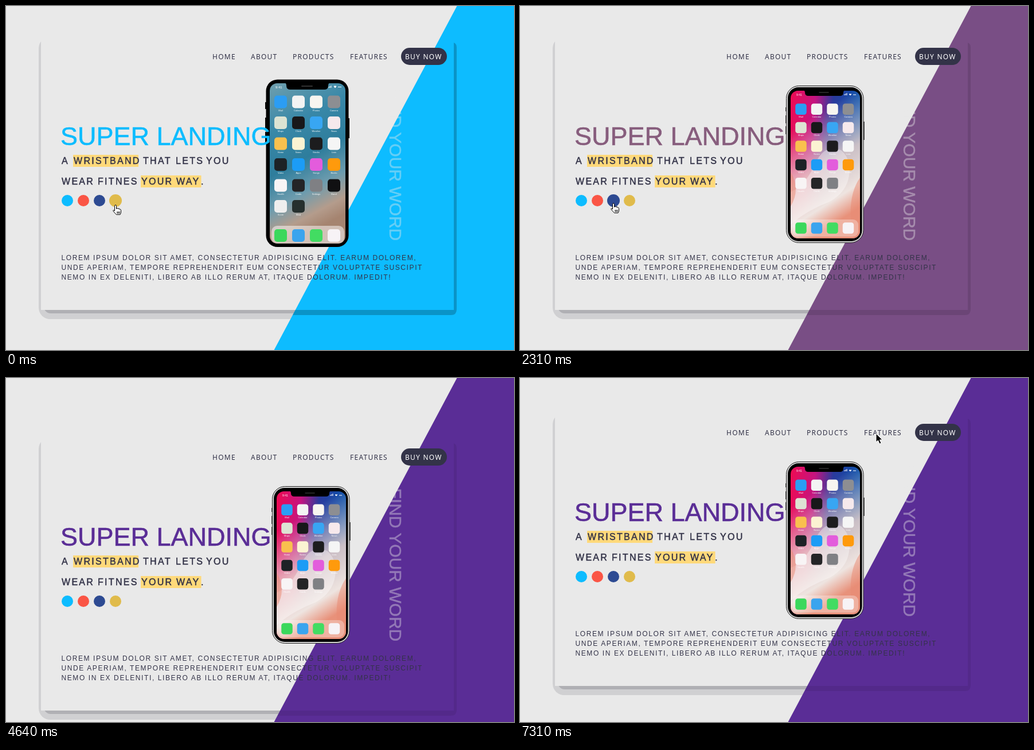
These frames come from a looping animation (886 by 601 pixels, 8000 ms). An HTML page:

```html
<!DOCTYPE html>
<html lang="en">
<head>
<meta charset="utf-8">
<title>Super Landing</title>
<style>
  html, body { margin: 0; width: 100%; height: 100%; overflow: hidden; background: #e9e9e9; }
  svg { display: block; width: 886px; height: 601px; font-family: "Liberation Sans", Arial, sans-serif; }
  .ink { fill: #333348; }
  .nav { font: 500 12px "Noto Sans", "Open Sans", sans-serif; letter-spacing: 1.25px; }
  .title { font-size: 45px; stroke-width: .6px; }
  .lead { font-size: 16px; letter-spacing: 2.3px; stroke: #333348; stroke-width: .5px; }
  .copy { font-size: 12px; letter-spacing: 1.6px; }
  .side { font-size: 30px; fill: #e9e9e9; opacity: .4; stroke: #e9e9e9; stroke-width: .5px; }
  .label { font-size: 4px; fill: #fff; text-anchor: middle; }
  .clock { font-size: 6px; fill: #fff; }
</style>
</head>
<body>
<svg viewBox="0 0 886 601">
  <defs>
    <clipPath id="wedge"><path d="M786.500 0H886V601H467.500Z"/></clipPath>
    <linearGradient id="lake" x2=".25" y2="1">
      <stop offset="0" stop-color="#6f9fae"/><stop offset=".3" stop-color="#3988a8"/>
      <stop offset=".55" stop-color="#2e7d9c"/><stop offset=".75" stop-color="#6d9cae"/>
      <stop offset=".9" stop-color="#b49c8c"/><stop offset="1" stop-color="#a58470"/>
    </linearGradient>
    <linearGradient id="sky" x2="1" y2=".2">
      <stop offset="0" stop-color="#ef0b52"/><stop offset=".35" stop-color="#c41480"/>
      <stop offset=".6" stop-color="#2b3a9c"/><stop offset="1" stop-color="#0753ac"/>
    </linearGradient>
    <linearGradient id="haze" x2=".3" y2="1">
      <stop offset=".25" stop-color="#ecdcd8" stop-opacity="0"/><stop offset=".6" stop-color="#ecd2ca" stop-opacity=".85"/>
      <stop offset=".85" stop-color="#eee4e0"/><stop offset="1" stop-color="#e8917a"/>
    </linearGradient>
    <clipPath id="screen"><rect x="472" y="148" width="121" height="258" rx="13"/></clipPath>
  </defs>

  <rect width="886" height="601" fill="#e9e9e9"/>
  <g class="scroll">
    <rect x="57" y="54" width="725" height="493" rx="20" fill="#d0d0d2"/>
    <rect x="66" y="60" width="715" height="477" rx="12" fill="#b0b0b4"/>
    <rect x="61" y="50" width="725" height="481" fill="#e9e9e9"/>
  </g>
  <path id="panel" d="M786.500 0H886V601H467.500Z"/>
  <g clip-path="url(#wedge)"><g class="scroll">
    <path id="edge" d="M781 64q5 2 5 8V530q0 10-10 10H470V531H781Z"/>
  </g></g>

  <g class="scroll">
    <rect x="689" y="73" width="80" height="30" rx="15" class="ink"/>
    <g class="nav ink">
      <text x="360" y="93">HOME</text><text x="427" y="93">ABOUT</text>
      <text x="500" y="93">PRODUCTS</text><text x="600" y="93">FEATURES</text>
      <text x="696" y="93" style="fill:#fff">BUY NOW</text>
    </g>
    <text class="side" transform="translate(669 142.500) rotate(90)">FIND YOUR WORD</text>

    <g id="phoneA">
      <path d="M452 168h3v12h-3zM452 195h3v20h-3zM452 220h3v20h-3zM596 196h3v35h-3z"/>
      <rect x="453.500" y="128.500" width="144" height="292.500" rx="20"/>
      <rect x="460" y="135" width="132" height="280" rx="13" fill="url(#lake)"/>
      <path d="M486 134q3 1 3 5 0 7 6 7h61q6 0 6-7 0-4 3-5z"/>
      <path d="M516 140h18" stroke="#333" stroke-width="2" stroke-linecap="round"/>
      <path d="M563 143v-2M565 143v-3M567 143v-4M572 140l2 3 2-3zM579 141.500h6" stroke="#fff" fill="#fff"/>
      <text class="clock" x="470" y="144">9:41</text>
      <rect x="463" y="384" width="127" height="31" rx="10" fill="#fff" opacity=".5"/>
    </g>

    <g id="phoneB">
      <path d="M463 177h2v7h-2zM463 191h2v14h-2zM463 210h2v14h-2zM599 202h2v32h-2z" fill="#555"/>
      <rect x="464.500" y="139.500" width="134.500" height="274" rx="22" fill="#d6d6d6" stroke="#222"/>
      <rect x="467" y="142" width="129.500" height="269" rx="19"/>
      <g clip-path="url(#screen)">
        <rect x="472" y="148" width="121" height="258" fill="url(#sky)"/>
        <rect x="472" y="148" width="121" height="258" fill="url(#haze)"/>
        <path d="M472 325q25-10 42-48t46-25q18 15 14 44t-34 46q-40 15-68 40z" fill="#fff" opacity=".35"/>
        <path d="M472 290q18 30 0 60zM593 300q-25 35-12 106h12z" fill="#e98a72" opacity=".5"/>
      </g>
      <path d="M494 147q3 1 3 4 0 6 6 6h55q6 0 6-6 0-3 3-4z"/>
      <path d="M522 151h16" stroke="#333" stroke-width="1.500" stroke-linecap="round"/>
      <path d="M566 156v-2M568 156v-3M570 156v-4M574 154l2 2 2-2zM581 155h5" stroke="#fff" fill="#fff"/>
      <text class="clock" x="482" y="157" style="font-size:5px">9:41</text>
      <rect x="475" y="373" width="115" height="30" rx="9" fill="#fff" opacity=".3"/>
    </g>

    <text id="title" class="title" x="95" y="243">SUPER LANDING</text>
    <path d="M117 260h114v21H117zM235 296h105.500v21H235z" fill="#ffd97a"/>
    <g class="lead ink">
      <text y="276"><tspan x="97">A</tspan><tspan x="118">WRISTBAND</tspan><tspan x="239">THAT</tspan><tspan x="296">LETS</tspan><tspan x="349">YOU</tspan></text>
      <text y="312"><tspan x="97">WEAR</tspan><tspan x="160">FITNES</tspan><tspan x="236">YOUR</tspan><tspan x="297">WAY</tspan><tspan x="340">.</tspan></text>
    </g>
    <circle cx="107" cy="340" r="10" fill="#0dbcff"/>
    <circle cx="135" cy="340" r="10" fill="#fa5545"/>
    <circle id="navy" cx="163" cy="340" r="10" fill="#2d4a92"/>
    <circle id="gold" cx="191" cy="340" r="10" fill="#e0bb4b"/>
    <g class="copy ink">
      <text x="96.500" y="444">LOREM IPSUM DOLOR SIT AMET, CONSECTETUR ADIPISICING ELIT. EARUM DOLOREM,</text>
      <text x="96.500" y="461">UNDE APERIAM, TEMPORE REPREHENDERIT EUM CONSECTETUR VOLUPTATE SUSCIPIT</text>
      <text x="96.500" y="478">NEMO IN EX DELENITI, LIBERO AB ILLO RERUM AT, ITAQUE DOLORUM. IMPEDIT!</text>
    </g>
  </g>

  <path id="hand" d="M3.500 2.500q0-1.800 1.500-1.800t1.500 1.800v5q0-1.500 1.500-1.300t1.500 1.300q.3-1 1.500-.7t1.200 1.500q2-.7 2.300 1.200v3.500q0 2-1.500 4.500H6.500L1.500 12q-1.500-2.300 0-2.600L3.500 11zM8 12v4M10 12v4M12 12v4" fill="#fff" stroke="#000"/>
  <path id="arrow" d="M0 0v15l3.500-3 2.500 6 3-1.200-2.600-5.800H11z" stroke="#fff"/>
</svg>
<script>
const byId = id => document.getElementById(id);
const scrolled = document.querySelectorAll('.scroll');
const LOOP = 8000, TICK = 178.2;
const BLUE = [13, 188, 255], GOLD = [224, 187, 75], PURPLE = [90, 45, 150];
// Page offset from each tick onwards.
const OFFSETS = [[0, 0], [22, 79], [23, 140], [24, 154], [26, 50], [27, -70], [28, -54], [31, -20], [32, 2], [33, 7]];

function svg(parent, tag, attrs, text) {
  const el = document.createElementNS('http://www.w3.org/2000/svg', tag);
  for (const name in attrs) el.setAttribute(name, attrs[name]);
  if (text) el.textContent = text;
  parent.append(el);
}

const TILES = ['#2b9df4', '#f3f3f3', '#f7f5f0', '#8d8e92', '#dde3d3', '#18181a', '#38a6f3', '#f6e9ec',
  '#f9c04e', '#fbf3d2', '#1c1c1e', '#f5f5f5', '#1d2226', '#1c9cf6', '#e35cdc', '#ff9a0c',
  '#f8f4f5', '#242426', '#7f8084', '#101012', '#eee', '#26302e'];
const LABELS = 'Mail Calendar Photos Camera Maps Clock Weather News Home Notes Stocks Lists Video Apps Songs Books Health Cards Settings Band Score Mind'.split(' ');
const DOCK = ['#3bd85c', '#3aa4ee', '#42dc62', '#f7f3f6'];

function addIcons(phone, count, size, x, y, dx, dy, dockY) {
  const tile = (cx, cy, fill) => svg(phone, 'rect',
    { x: cx - size / 2, y: cy - size / 2, width: size, height: size, rx: size * .23, fill });
  for (let i = 0; i < count; i++) {
    const cx = x + i % 4 * dx, cy = y + (i >> 2) * dy;
    tile(cx, cy, TILES[i]);
    svg(phone, 'text', { x: cx, y: cy + size / 2 + 5, class: 'label' }, LABELS[i]);
  }
  DOCK.forEach((fill, i) => tile(x + i * dx, dockY, fill));
}
addIcons(byId('phoneA'), 22, 22, 479, 167.5, 31, 36.5, 401);
addIcons(byId('phoneB'), 19, 19.5, 490, 180.2, 27.5, 32.4, 388);

const clamp = v => Math.min(1, Math.max(0, v));
const bezier = (u, a, b) => 3 * u * (1 - u) ** 2 * a + 3 * u * u * (1 - u) * b + u ** 3;

function ease(p) {
  let lo = 0, hi = 1;
  for (let i = 0; i < 20; i++) {
    const mid = (lo + hi) / 2;
    if (bezier(mid, .25, .25) < p) lo = mid; else hi = mid;
  }
  return bezier(lo, .1, 1);
}
const mix = (a, b, p) => a.map((v, i) => v + (b[i] - v) * p);
const rgb = c => `rgb(${c.map(Math.round)})`;
const progress = (t, start) => ease(clamp((t - start) / 1000));
const theme = t => mix(mix(BLUE, GOLD, progress(t, 220)), PURPLE, progress(t, 1850));
const place = (el, x, y) => el.setAttribute('transform', `translate(${x} ${y})`);
const show = (el, on) => el.setAttribute('visibility', on ? 'visible' : 'hidden');

function draw(ms) {
  const tick = Math.floor((ms + 9) / TICK), t = tick * TICK;
  const offset = OFFSETS.findLast(([from]) => from <= tick)[1];
  scrolled.forEach(el => place(el, 0, offset));

  byId('panel').setAttribute('fill', rgb(theme(t)));
  const titleColor = rgb(theme(t - 80));
  byId('title').setAttribute('fill', titleColor);
  byId('title').setAttribute('stroke', titleColor);
  byId('edge').setAttribute('fill-opacity', .22 - .14 * progress(t, 1850));
  show(byId('phoneA'), tick < 11);
  show(byId('phoneB'), tick >= 11);

  const move = clamp((tick - 7) / 3);
  place(byId('hand'), 186 - 28 * move, 347 - 3 * move);
  show(byId('hand'), tick < 14);
  byId('gold').setAttribute('r', tick < 8 ? 11 : 10);
  byId('navy').setAttribute('r', tick >= 10 && tick < 14 ? 11 : 10);

  const u = clamp((tick - 35) / 5), v = 1 - u;
  place(byId('arrow'), v * v * 780 + 2 * u * v * 650 + u * u * 621, v * v * 244 + 2 * u * v * 200 + u * u * 97);
  show(byId('arrow'), tick >= 35);
}

const start = performance.now();
function loop() {
  draw((performance.now() - start) % LOOP);
  requestAnimationFrame(loop);
}
loop();
</script>
</body>
</html>
```
